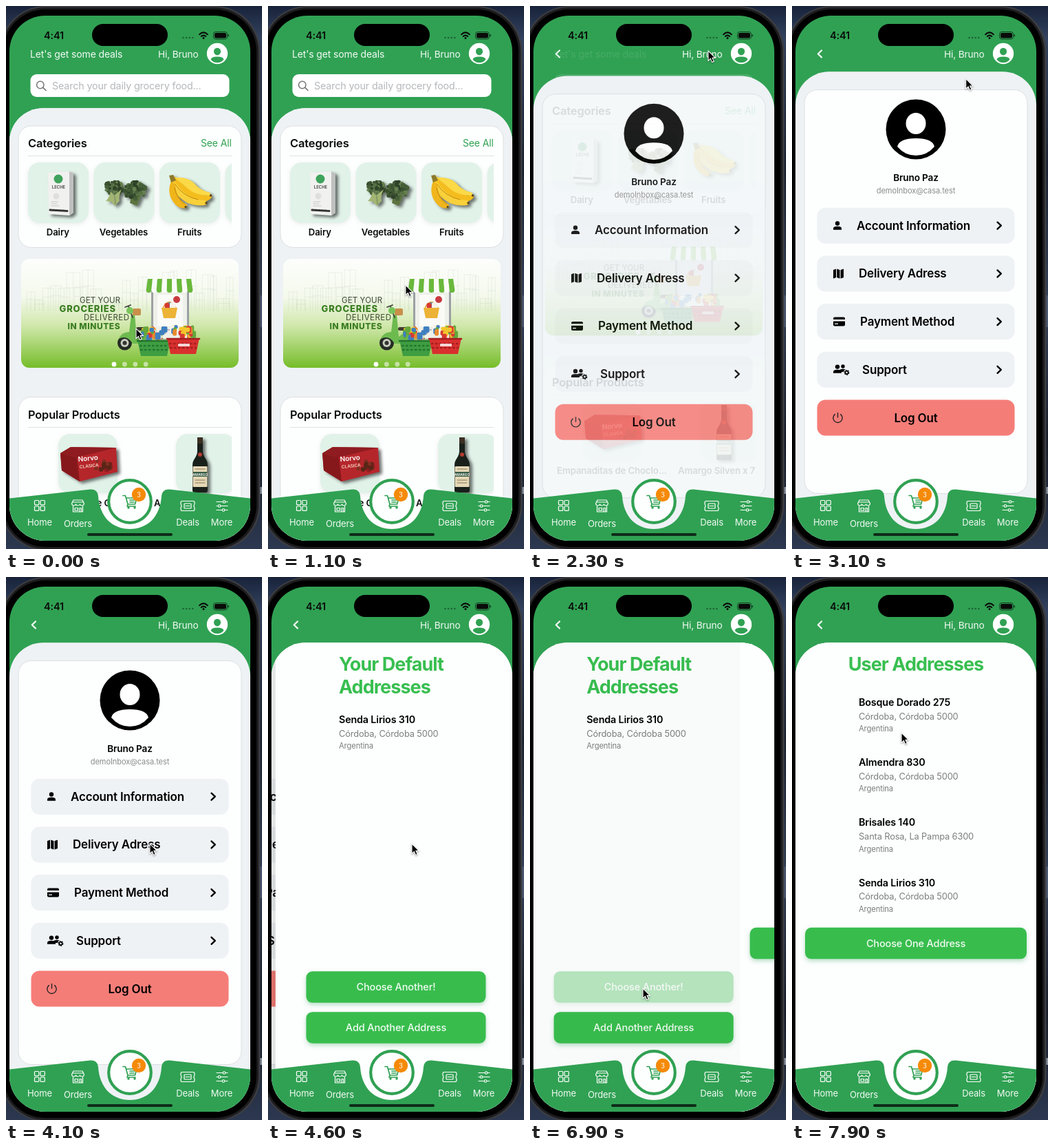
These frames come from a looping animation (372x788 px, 8 s). An HTML page:

```html
<!DOCTYPE html>
<html lang="en">
<head>
<meta charset="utf-8">
<title>Grocery app</title>
<style>
html, body { margin: 0; width: 100%; height: 100%; overflow: hidden; background: #1b2435; }
svg { display: block; width: 372px; height: 788px; }
text { font-family: Inter, "Open Sans", sans-serif; letter-spacing: -.01em; }
.bold { font-weight: 600; }
.mid { text-anchor: middle; }
.title { font-size: 27px; font-weight: 700; letter-spacing: -.035em; fill: #38bf50; }
.line { fill: none; stroke-linecap: round; stroke-linejoin: round; }
.button { fill: #38bd4d; filter: drop-shadow(0 3px 3px #2e9f5555); }
.tile { fill: #e1f2e9; filter: drop-shadow(0 2px 3px #0001); }
.card { fill: #fdfefe; stroke: #dcdfe1; }
.item { filter: drop-shadow(4px 3px 2px #0008); }
</style>
</head>
<body>
<svg id="stage" viewBox="0 0 372 788"></svg>
<script>
const GREEN = '#30a153', PALE = '#eef2f5';
const byId = id => document.getElementById(id);
const range = n => [...Array(n).keys()];

let seed = 7;
const random = () => (seed = seed * 16807 % 2147483647) / 2147483647;
const between = (a, b) => +(a + random() * (b - a)).toFixed(1);
const pick = list => list[Math.floor(random() * list.length)];

const text = (x, y, size, words, fill = '#0b0b0b', cls = '', more = '') =>
  `<text x="${x}" y="${y}" font-size="${size}" fill="${fill}" class="${cls}" ${more}>${words}</text>`;
const box = (x, y, w, h, r, fill, more = '') =>
  `<rect x="${x}" y="${y}" width="${w}" height="${h}" rx="${r}" fill="${fill}" ${more}/>`;
const disc = (x, y, r, fill, more = '') => `<circle cx="${x}" cy="${y}" r="${r}" fill="${fill}" ${more}/>`;
const path = (d, fill, more = '') => `<path d="${d}" fill="${fill}" ${more}/>`;
const line = (d, color, width, more = '') =>
  `<path class="line" d="${d}" stroke="${color}" stroke-width="${width}" ${more}/>`;
const at = (x, y, inner, more = '') => `<g transform="translate(${x} ${y})" ${more}>${inner}</g>`;

const avatar = (x, y, r, back, front) => at(x, y, `<g transform="scale(${r / 43})">
  ${disc(0, 0, 43.5, back)}<ellipse cy="-8.5" rx="14.5" ry="15.5" fill="${front}"/>
  ${path('M-27 25Q-24 13 0 13T27 25Q16 38 0 38T-27 25Z', front)}</g>`);

// Device and header
const device = () => box(0, 0, 372, 788, 0, 'url(#backdrop)')
  + box(369, 420, 3, 46, 0, '#4a5872') + box(369, 698, 3, 10, 0, '#8b93a0')
  + box(-9, 0, 378.5, 790, 66, '#3c3d41') + box(-7, 2, 374, 786, 64, '#1d1d20')
  + box(-4, 5, 368, 780, 61, '#000');

const statusBar = () => text(55, 48, 14.5, '4:41', '#0a0a0a', 'bold')
  + box(125, 26, 110, 32, 16, '#000')
  + range(4).map(i => disc(257.5 + i * 4.6, 46, 1.3, '#1c6335')).join('')
  + line('M281.2 41.2Q287 35.6 292.8 41.2', '#0a0a0a', 2.2)
  + line('M283.8 44Q287 41.2 290.2 44', '#0a0a0a', 2.1) + disc(287, 46.4, 1.5, '#0a0a0a')
  + box(301.5, 37.5, 20, 10.5, 3.2, 'none', 'stroke="#123d20"')
  + box(303, 39, 17, 7.5, 2, '#0a0a0a') + box(322.5, 41, 1.5, 3.5, .7, '#123d20');

const header = () => `<g id="greeting">${text(35, 74.5, 14, "Let's get some deals", '#f2faf5')}
  ${box(35.5, 99, 289, 33, 9, '#fff')}
  <circle cx="49.8" cy="114.5" r="5.2" class="line" stroke="#777" stroke-width="1.5"/>
  ${line('M53.8 118.4L58 122.5', '#777', 1.7)}
  ${text(67, 121, 14.3, 'Search your daily grocery food...', '#b4b7ba')}</g>
  <g id="back">${line('M43 64.5L37.8 69.5L43 74.5', '#fff', 2.2)}</g>
  ${text(221, 74.5, 13.7, 'Hi, Bruno', '#f2faf5')}${avatar(307, 69, 15, '#fff', GREEN)}`;

// Home
const carton = () => `<g class="item">${path('M61 242L92 240L98 243V300L92 304L62 302Z', '#f1f1ef')}
  ${path('M92 240L98 243V300L92 304Z', '#bfc0bf')}</g>${disc(76, 251, 6.5, '#3fa35b')}
  ${text(76.5, 265, 6, 'LECHE', '#444', 'bold mid')}${disc(73, 276, 4.5, '#dfe0dd')}
  ${line('M66 284H76M66 287H74M66 290H77', '#bbb', .8)}${line('M64 296L89 297.5', '#333', 3, 'stroke-dasharray="3 1.6"')}`;

const floret = (x, y, w, h, n) => range(n).map(() => {
  const a = random() * 6.283, d = Math.sqrt(random());
  return disc(+(x + Math.cos(a) * d * w).toFixed(1), +(y + Math.sin(a) * d * h).toFixed(1), between(1.6, 3.6),
    pick(['#3b5130', '#465f38', '#567044', '#2f4228', '#66804f']));
}).join('');
const broccoli = () => `<g class="item">${path('M182 276L196 276L190 290L180 286Z', '#5d7440')}
  ${floret(156, 265, 14.5, 10, 60)}${floret(188, 268, 16, 12.5, 90)}
  ${path('M145 283Q151 277 152 269L157 275L168 266Q163 276 165 283L158 290L153 284Z', '#a3b573')}</g>
  ${line('M158 276L159 287', '#809660', 1.6)}`;

const bananas = () => `<g class="item">
  ${path('M239 251Q242 246 246 248Q258 262 274 270Q289 276 299 275Q300 279 292 283Q270 289 251 273Q240 262 239 251Z', '#f4bd1d')}
  ${path('M241 253Q243 275 264 286Q281 292 292 288L290 282Q264 282 247 257Z', '#f8d03a')}
  ${path('M240 254Q232 274 247 289Q255 295 262 293L263 288Q247 280 246 258Z', '#f0b51a')}
  ${path('M245 249Q266 247 277 261Q284 268 297 271L297 275Q276 276 263 264Z', '#fbd947')}
  ${path('M237 246L243 245L247 253L240 256Z', '#8d7a2b')}</g>
  ${line('M246 259Q257 276 279 281M245 264Q248 280 260 288', '#bf8612', 1)}
  ${disc(297.5, 275, 1.7, '#594518')}${disc(291, 286, 1.7, '#594518')}${disc(261, 291.5, 1.6, '#594518')}`;

const skyline = () => range(26).map(i => {
  const x = 30 + i * 11.6, h = between(12, 60), w = between(9, 20);
  return `M${x} 442v${-h}h${w}V442M${x + w / 2} ${442 - h}v${h}M${x} ${(442 - h * .6).toFixed(1)}h${w}`;
}).join('');
const goods = (x, y, w, n) => range(n).map(() =>
  box(between(x, x + w), between(y, y + 13), between(4, 9), between(5, 11), 2,
    pick(['#d63a32', '#f4c62d', '#f3f1e6', '#3f7fbf', '#e98a2c', '#62a83c', '#f7f3ea']))).join('');
const basket = (x, y, w, color, dark) =>
  path(`M${x} ${y}h${w}l-5 23h${10 - w}z`, color)
  + line(`M${x + 4} ${y + 8}h${w - 8}M${x + 5} ${y + 14}h${w - 10}`, dark, 2.4, 'stroke-dasharray="1.5 4.5"')
  + line(`M${x} ${y + 1}h${w}`, dark, 2.5);

const scooter = () => disc(172.5, 489, 10.5, '#252a25') + disc(172.5, 489, 6, '#c6cdbd') + disc(172.5, 489, 3, '#333')
  + path('M164 483Q168 473 179 473L182 448L187 448L190 480L198 474Q212 476 212 490H184Q176 477 164 483Z', '#6dba4f')
  + box(184, 439, 12, 10, 2, '#c88f4b') + line('M184 452L178 436M173 437L181 434', '#3c4238', 1.8)
  + disc(180, 442, 5, '#78c45a') + box(189, 466, 18, 5, 2.5, '#403a31');

const shop = () => box(211, 398, 55, 86, 6, '#9ba1a2') + box(214, 401, 49, 82, 4, '#eef0ea')
  + box(220, 419, 37, 46, 2, '#fafaf7') + line('M228 438Q237 421 247 438', '#e2a12e', 1.4)
  + goods(228, 430, 12, 9) + path('M226 438h23l-3 15h-17z', '#edb336') + disc(248, 426, 5, '#c83a40')
  + line('M220 470h18M220 475h12', '#aaa', 1.4)
  + range(9).map(i => path(`M${206 + i * 7} 396h7l${((i - 4) * .5 + .4).toFixed(1)} 16a3.8 4 0 0 1 -7.7 0z`,
    i % 2 ? '#fafcf7' : '#69b83b')).join('');

const banner = () => box(22, 367, 316, 158, 12, 'url(#meadow)')
  + line(skyline(), '#70806d', .6, 'opacity=".16"') + shop() + scooter()
  + goods(196, 465, 32, 34) + goods(238, 463, 32, 34)
  + basket(191, 485, 48, '#3f9d42', '#24752e') + basket(234, 482, 47, '#d8302e', '#a51e20')
  + box(250, 490, 17, 4, 1, '#fff', 'opacity=".8"')
  + text(107, 431, 11.5, 'GET YOUR', '#3d4a37', '', 'style="letter-spacing:.01em"')
  + text(77.5, 444, 13, 'GROCERIES', '#3a7d22', '', 'font-weight="800" style="letter-spacing:.065em"')
  + text(113, 456, 11.5, 'DELIVERED', '#3d4a37', '', 'style="letter-spacing:.04em"')
  + text(89.5, 468.5, 12, 'IN MINUTES', '#3a7d22', '', 'font-weight="800" style="letter-spacing:.045em"')
  + range(4).map(i => disc(157 + i * 15.4, 520, 3.4, '#fff', `opacity="${i ? .55 : 1}"`)).join('');

const burgerBox = () => `<g class="item">${path('M79 649L94 640L160 641L162 676L107 690L81 674Z', '#b5262b')}
  ${path('M79 649L94 640L160 641L103 655Z', '#8f1c20')}${path('M79 649L103 655L107 690L81 674Z', '#86181c')}</g>
  ${range(14).map(() => disc(between(130, 154), between(660, 674), between(1.5, 4), pick(['#5a2517', '#7d2f20', '#8d1d20']))).join('')}
  <g transform="rotate(-6 118 660)">${text(105, 660, 10, 'Norvo', '#fff', 'bold')}
  ${text(106, 670, 6.5, 'CLASICA', '#f5d7c2', 'bold')}</g>`;

const bottle = () => `<g class="item">${path('M278 626h8v20q0 5 4 11q3 4 3 10v36q0 3-3 3h-16q-3 0-3-3v-36q0-6 3-10q4-6 4-11z', '#19201a')}</g>
  ${box(278, 626, 8, 9, 1, '#3a2f22')}${box(271.5, 668, 21, 30, 1, '#e5d8b6')}
  ${disc(282, 651, 3, '#b23b31')}${box(272, 676, 20, 7, 0, '#365a43')}
  ${text(282, 681.5, 5, 'AMARGO', '#fff', 'bold mid')}${line('M275 672h14M275 688h14M275 692h14', '#8a7455', 1)}`;

const tile = (x, y, w = 88) => `<rect class="tile" x="${x}" y="${y}" width="${w}" height="${w}" rx="17"/>`;
const home = () => `${box(5, 140, 350, 720, 0, PALE)}
  <rect class="card" x="18" y="174" width="324" height="176.5" rx="19"/>
  ${text(32, 204.5, 16.5, 'Categories', '#0b0b0b', 'bold')}${text(283, 204, 14, 'See All', GREEN)}
  ${line('M32 217.5H328', '#e0e2e3', 1)}
  <g clip-path="url(#shelf)">${range(4).map(i => tile(32 + i * 95.5, 227)).join('')}
  ${carton()}${broccoli()}${bananas()}</g>
  ${['Dairy', 'Vegetables', 'Fruits'].map((s, i) => text(75.3 + i * 95.7, 332.5, 13.2, s, '#0b0b0b', 'bold mid')).join('')}
  ${banner()}
  <rect class="card" x="18" y="567.5" width="324" height="192" rx="19"/>
  ${text(32, 598.5, 16.4, 'Popular Products', '#0b0b0b', 'bold')}${line('M32 611.5H328', '#e0e2e3', 1)}
  <g clip-path="url(#shelf)">${tile(76, 621, 86)}${tile(247, 621, 86)}${burgerBox()}${bottle()}
  ${text(119, 726, 13.2, 'Empanaditas de Choclo...', '#0b0b0b', 'bold mid')}
  ${text(215, 726, 13.2, 'Amargo Silven x 7', '#0b0b0b', 'bold')}</g>`;

// Profile
const person = (x, y, s = 1) => at(x, y, `<g transform="scale(${s})">${disc(0, -3.2, 3.2, '#000')}
  ${path('M-6 6V4Q-6 1 0 1T6 4V6Z', '#000')}</g>`);
const menu = [
  ['Account Information', 94, person(66, 0)],
  ['Delivery Adress', 97, path('M60-5.5L64-7V5.5L60 7ZM65.2-7L69.4-5.5V7L65.2 5.5ZM70.6-5.5L75-7V5.5L70.6 7Z', '#000')],
  ['Payment Method', 99, box(60, -6.5, 17, 13, 2, '#000') + box(60, -3.2, 17, 2.6, 0, PALE) + box(62, 2.5, 5, 1.3, 0, PALE)],
  ['Support', 102, person(66, -1) + person(74, -2, .85)
    + `<circle cx="79.5" cy="4" r="2.7" fill="none" stroke="${PALE}" stroke-width="4"/>
       <circle cx="79.5" cy="4" r="2.6" fill="none" stroke="#000" stroke-width="2.6" stroke-dasharray="1.7 .9"/>
       <circle cx="79.5" cy="4" r="2.2" fill="none" stroke="#000" stroke-width="1.4"/>`]
];
const profile = () => `<rect id="profileCard" class="card" x="18" y="121.5" width="324" height="586" rx="19"/>
  ${avatar(180, 179, 43, '#000', '#fff')}
  ${text(180, 253.5, 13.6, 'Bruno Paz', '#000', 'bold mid')}${text(180, 272, 11.1, 'demoInbox@casa.test', '#8b8b8b', 'mid')}
  ${menu.map(([label, x, icon], i) => at(0, 318.7 + i * 69.7, box(36.5, -26, 287, 52, 12, PALE) + icon
    + text(x, 6, 17, label, '#000', 'bold') + line('M298.5-5L303.8 0L298.5 5', '#000', 2.4), i === 1 ? 'id="delivery"' : '')).join('')}
  ${box(36.5, 571.5, 287, 52, 12, '#f57d78')}${line('M66.5 590.5V597M62.3 592.6A6.7 6.7 0 1 0 70.7 592.6', '#222', 1.4)}
  ${text(180, 603.5, 17, 'Log Out', '#000', 'bold mid')}`;

// Addresses
const sheet = () => box(5, 90, 350, 720, 0, '#fdfefe');
const place = (y, street, city = 'Córdoba, Córdoba 5000') => text(97, y, 14.3, street, '#000', 'bold')
  + text(97, y + 19.7, 12.8, city, '#7d7d7d') + text(97, y + 37.2, 11.2, 'Argentina', '#7d7d7d');
const button = (x, y, label, id = '') => `<g id="${id}">
  <rect class="button" x="${x}" y="${y}" width="${360 - 2 * x}" height="45.5" rx="9"/>
  ${text(180, y + 28, 14.5, label, '#f1fbf3', 'mid', 'font-weight="500"')}</g>`;

const chosen = () => sheet() + text(97, 135.5, 27, 'Your Default', '', 'title') + text(97, 169, 27, 'Addresses', '', 'title')
  + place(212, 'Senda Lirios 310') + button(49.5, 572.3, 'Choose Another!', 'another')
  + button(49.5, 631.2, 'Add Another Address', 'adding');
const list = () => sheet() + text(180, 135.5, 27, 'User Addresses', '', 'title mid')
  + place(187, 'Bosque Dorado 275') + place(274.2, 'Almendra 830')
  + place(361.3, 'Brisales 140', 'Santa Rosa, La Pampa 6300') + place(448.5, 'Senda Lirios 310')
  + button(19, 508.8, 'Choose One Address', 'confirm');

// Tab bar
const tabBar = () => path('M5 714.5L122 701.5Q133 700.5 134 711C136 742 155 759 180 759S224 742 226 711Q227 700.5 238 701.5L355 714.5V780H5Z', GREEN)
  + range(4).map(i => box(41.5 + i % 2 * 8.5, 717.5 + (i >> 1) * 8.5, 6.3, 6.3, 1, 'none', 'stroke="#fff" stroke-width="1.2"')).join('')
  + line('M98 717H111L113.5 722Q113 725 110.5 725T107.4 723Q107 725 104.5 725T101.5 723Q101 725 98.5 725T95.5 722ZM97.5 726V734H111.5V726M100 728.5h4.5v3.5h-4.5zM107 734V728.5h2.5V734M97 720h15', '#fff', 1.2)
  + line('M256 718.5H272Q274 718.5 274 721V723Q272 725.5 274 728V730Q274 732.5 272 732.5H256Q254 732.5 254 730V728Q256 725.5 254 723V721Q254 718.5 256 718.5Z', '#fff', 1.2)
  + box(259, 722, 10, 7, 1, 'none', 'stroke="#fff" stroke-width="1.2"') + line('M261 725.5h6', '#fff', 1)
  + line('M306 719.5H322M306 725.5H322M306 731.5H322', '#fff', 1.2)
  + [[317, 719.5], [310, 725.5], [316, 731.5]].map(([x, y]) => disc(x, y, 1.8, GREEN, 'stroke="#fff" stroke-width="1.1"')).join('')
  + [['Home', 49, 754], ['Orders', 104.5, 755.5], ['Deals', 264, 753.5], ['More', 313.5, 753.5]]
    .map(([s, x, y]) => text(x, y, 13, s, '#f2faf5', 'mid')).join('')
  + box(118, 765, 124, 4, 2, '#0d2c18')
  + disc(180, 719, 30.8, '#fdfefe', `stroke="${GREEN}" stroke-width="4.2"`)
  + line('M170 710.5H173.5L177 723H187.5L190 714H175M177 723L176 726H188M180 717h7M180 720h6', GREEN, 1.7)
  + disc(178, 728, 1.7, GREEN) + disc(187, 728, 1.7, GREEN)
  + disc(193, 709, 10.2, '#f58a07')
  + text(193, 712.5, 10, '3', '#fff', 'mid', 'style="font-family:\'Noto Serif\',serif"');

const shade = id => box(5, 90, 350, 720, 0, '#000', `id="${id}" opacity="0"`);
byId('stage').innerHTML = `<defs>
  <linearGradient id="backdrop" x2="0" y2="1"><stop stop-color="#18233a"/><stop offset=".06" stop-color="#33425f"/>
    <stop offset=".3" stop-color="#1a2232"/><stop offset=".55" stop-color="#35425b"/><stop offset=".8" stop-color="#171c29"/>
    <stop offset="1" stop-color="#2c3850"/></linearGradient>
  <linearGradient id="meadow" x2="0" y2="1"><stop stop-color="#fdfefc"/><stop offset=".35" stop-color="#f4f9ec"/>
    <stop offset=".62" stop-color="#cfe7a9"/><stop offset="1" stop-color="#76bd2a"/></linearGradient>
  <clipPath id="screen">${box(5, 14, 350, 762, 52, '#000')}</clipPath>
  <clipPath id="sheetShape">${box(5, 95.2, 350, 760, 49, '#000')}</clipPath>
  <clipPath id="shelf">${box(25, 222, 303, 540, 0, '#000')}</clipPath></defs>
  ${device()}
  <g clip-path="url(#screen)">${box(5, 14, 350, 762, 0, GREEN)}${header()}
  <g id="panel"><g clip-path="url(#sheetShape)">${box(5, 90, 350, 780, 0, PALE)}
    <g id="profile">${profile()}${shade('profileShade')}</g>
    <g id="home">${at(0, -53, home())}</g>
    <g id="chosen">${chosen()}${shade('chosenShade')}</g>
    <g id="list">${list()}</g></g></g>
  ${tabBar()}${statusBar()}</g>
  <g id="cursor">${path('M0 0V14.5L3.4 11.4L5.7 16.6L8.2 15.5L6 10.4H10.4Z', '#000', 'stroke="#fff" stroke-width="1.1" style="filter:drop-shadow(0 1px 1px #0006)"')}</g>`;

// Motion
const LOOP = 8000, STEP = 100;
// [start, end, x, y] of each pointer move
const moves = [[0, 0, 189, 468], [900, 1700, 259, 65], [2900, 3800, 209, 387],
  [4700, 5300, 224, 338], [5900, 6700, 164, 597], [7200, 7800, 159, 226]];
const clamp = v => Math.min(1, Math.max(0, v));
const smooth = v => v * v * (3 - 2 * v);
const spring = ms => {
  const k = Math.max(0, ms) * .014;
  return k > 9 ? 1 : 1 - (1 + k) * Math.exp(-k);
};
const press = (now, start) => now < start ? 1 : .35 + .65 * clamp((now - start - 100) / 250);
const move = (id, x, y) => byId(id).setAttribute('transform', `translate(${x.toFixed(2)} ${y.toFixed(2)})`);
const fade = (id, v) => byId(id).setAttribute('opacity', v.toFixed(3));

// A page enters from the right, then drifts left under the next one
function slide(id, enter, leave) {
  move(id, 350 * (1 - enter) - 105 * leave, 0);
  if (leave) fade(id + 'Shade', .1 * leave);
  else if (byId(id + 'Shade')) fade(id + 'Shade', 0);
}

function render(now) {
  const open = spring(now - 2038), toChosen = spring(now - 4170), toList = spring(now - 6853);
  move('panel', 0, 53 * (1 - open));
  fade('home', 1 - open);
  fade('greeting', 1 - open);
  fade('back', open);
  byId('profileCard').setAttribute('fill-opacity', (open ** 8).toFixed(3));
  slide('profile', 1, toChosen);
  slide('chosen', toChosen, toList);
  slide('list', toList, 0);
  fade('delivery', press(now, 4200));
  fade('another', press(now, 6900));
  let [, , x, y] = moves[0];
  for (const [start, end, toX, toY] of moves.slice(1)) {
    const p = smooth(clamp((now - start) / (end - start)));
    x += (toX - x) * p;
    y += (toY - y) * p;
  }
  move('cursor', x, y);
}

const began = performance.now();
function tick() {
  const now = (performance.now() - began) % LOOP;
  render(now < 200 ? 0 : Math.floor(now / STEP) * STEP);
  requestAnimationFrame(tick);
}
tick();
</script>
</body>
</html>
```
